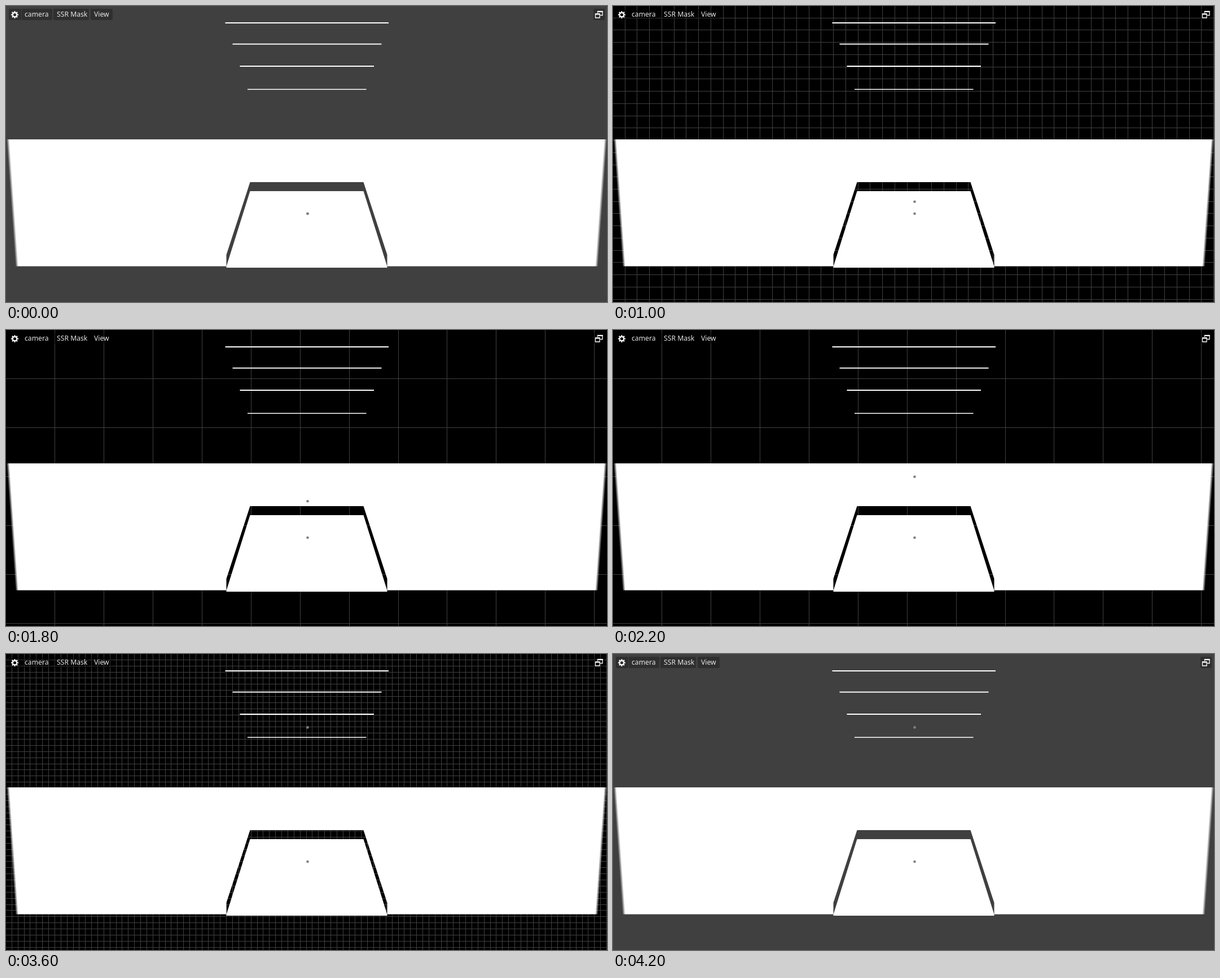
Write an HTML page with a canvas that moves like this. It is 1065 px wide and 526 px high and loops after 4600 ms.

```html
<!DOCTYPE html>
<html lang="en">
<head>
<meta charset="utf-8">
<title>Hierarchical ray march</title>
<style>
  html, body { margin: 0; width: 100%; height: 100%; overflow: hidden; background: #000; }
  canvas, svg { position: absolute; left: 0; top: 0; display: block; }
  text { font: 12.2px "Noto Sans", "Open Sans", sans-serif; fill: #e6e6e6; }
  .button { fill: #000; fill-opacity: .27; }
  .icon { fill: none; stroke: #fff; }
</style>
</head>
<body>
<canvas id="grid" width="1065" height="526"></canvas>
<svg width="1065" height="526" viewBox="0 0 1065 526">
  <defs>
    <linearGradient id="edge" gradientUnits="userSpaceOnUse" x1="1" y1="237" x2="5.96" y2="236.65">
      <stop offset="0" stop-color="#fff" stop-opacity="0"/>
      <stop offset="1" stop-color="#fff"/>
    </linearGradient>
    <!-- left half of the floor, with the gap around the box -->
    <path id="half" fill="url(#edge)"
      d="M0 237H533V313H432.5L390.5 442V463L432.5 329H533V465H390.5V462.5H14Z"/>
  </defs>

  <use href="#half"/>
  <use href="#half" transform="translate(1066) scale(-1 1)"/>

  <g fill="#fff">
    <rect x="388.5" y="29" width="289.5" height="2"/>
    <rect x="401.5" y="66.7" width="264" height="1.9"/>
    <rect x="414.5" y="106" width="237.5" height="2"/>
    <rect x="428" y="147.4" width="210.5" height="1.5"/>
  </g>

  <g class="button">
    <rect x="5" y="5" width="22" height="20" rx="2"/>
    <rect x="28" y="5" width="54" height="20" rx="2"/>
    <rect x="84" y="5" width="63" height="20" rx="2"/>
    <rect x="150" y="5" width="39" height="20" rx="2"/>
    <rect x="1041" y="5" width="20" height="20" rx="2"/>
  </g>
  <text x="33" y="19">camera</text>
  <text x="90" y="19">SSR Mask</text>
  <text x="156" y="19">View</text>

  <g class="icon">
    <circle cx="15.5" cy="15.5" r="3.7" stroke-width="2.2"/>
    <circle cx="15.5" cy="15.5" r="5.5" stroke-width="2" pathLength="16" stroke-dasharray="1" stroke-dashoffset=".5"/>
    <path d="M1048.5 12.5V9.5H1057V16.5H1053M1044.5 14H1052V21H1044.5Z" stroke-width="1.3"/>
    <path d="M1048 10H1057.5M1044 14.5H1052.5" stroke-width="2"/>
  </g>

  <g fill="#808080">
    <circle cx="534.5" cy="369" r="2.3"/>
    <circle id="ray" cx="534.5" r="2.3"/>
  </g>
</svg>
<script>
const LOOP = 4600, STEP = 200;
const SCALE = 1065 / 784;   // screen pixels per texel
const LEVELS = [0, 1, 2, 3, 4, 3, 4, 5, 6, 5, 6, 7, 6, 5, 6, 5, 4, 3, 2, 1, 0];
const SURFACE_STEP = 13, SURFACE = 97.2;
const canvas = document.getElementById('grid');
const ctx = canvas.getContext('2d');
const ray = document.getElementById('ray');

// Going up a level means the ray crossed its cell; going down means a hit.
function march() {
  let y = 271;
  return LEVELS.map((level, i) => {
    if (i === 0) return 271.6;
    const last = LEVELS[i - 1], cell = 2 ** last;
    if (level > last) y = (Math.ceil(y / cell) - 1) * cell;
    else if (i === SURFACE_STEP) y = SURFACE;
    return y;
  });
}
const positions = march();

function drawGrid(level) {
  const { width, height } = canvas;
  ctx.fillStyle = level ? '#000' : '#404040';
  ctx.fillRect(0, 0, width, height);
  if (!level) return;
  ctx.fillStyle = '#404040';
  const pitch = 2 ** level * SCALE;
  for (let i = 1; i * pitch < width + 1; i++) {
    const at = Math.round(i * pitch) - 1;
    ctx.fillRect(at, 0, 1, height);
    ctx.fillRect(0, at, width, 1);
  }
}

let shown = -1;
function frame() {
  const slot = Math.floor(performance.now() % LOOP / STEP);
  const step = Math.min(Math.max(slot - 1, 0), LEVELS.length - 1);
  if (step !== shown) {
    shown = step;
    drawGrid(LEVELS[step]);
    ray.setAttribute('cy', positions[step] * SCALE);
  }
  requestAnimationFrame(frame);
}
frame();
</script>
</body>
</html>
```
